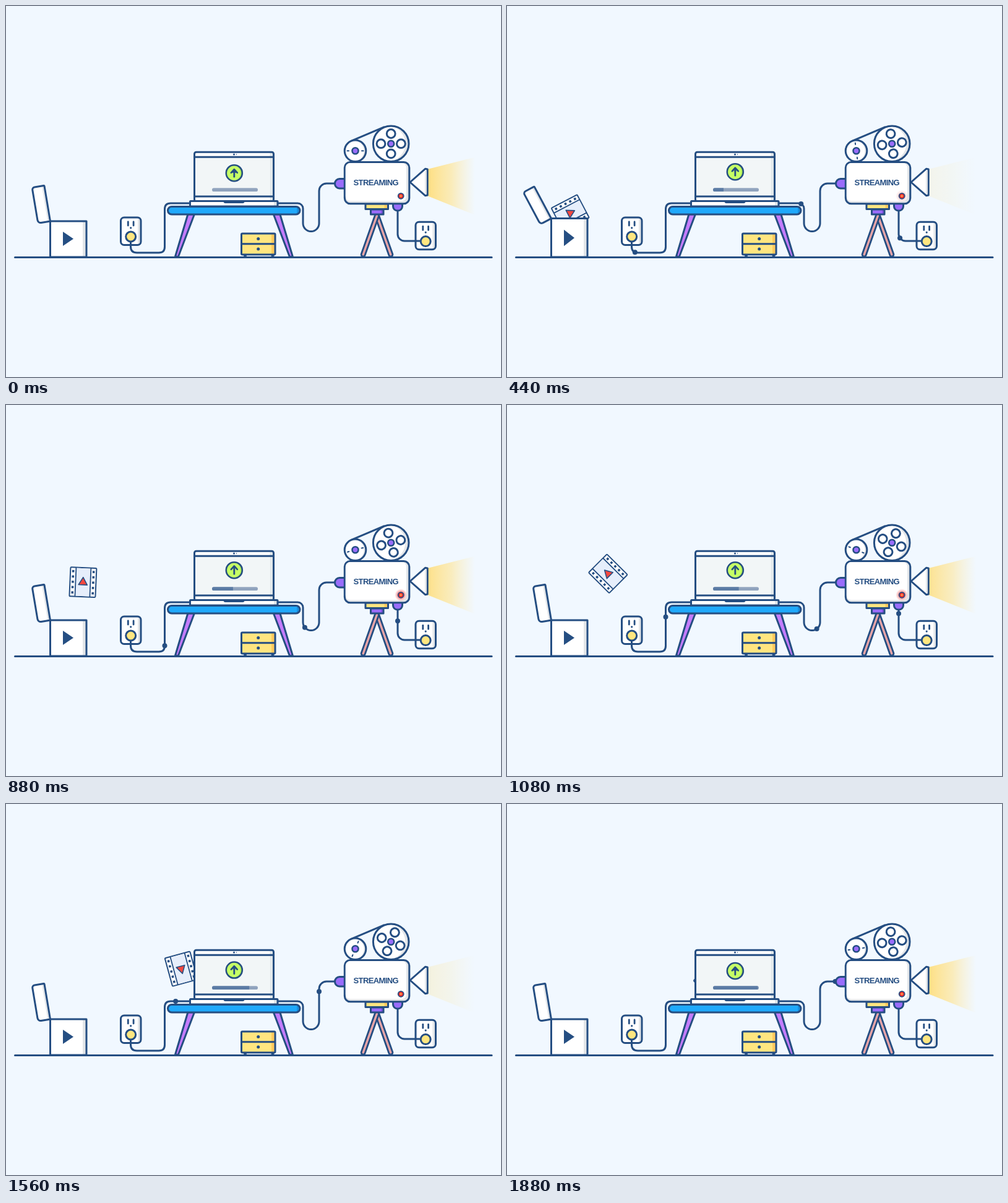
Write an HTML page with a canvas that moves like this. It is 800 by 600 pixels and loops after 1920 ms.

```html
<!DOCTYPE html>
<html lang="en">
<head>
<meta charset="utf-8">
<title>Streaming</title>
<style>
html, body { margin: 0; width: 100%; height: 100%; overflow: hidden; background: #f1f8ff; }
canvas { display: block; width: 800px; height: 600px; }
</style>
</head>
<body>
<canvas id="stage" width="800" height="600"></canvas>
<script>
const ctx = document.getElementById('stage').getContext('2d');
const LOOP = 1920, STEP = 40, TAU = Math.PI * 2;
const NAVY = '#254e82', WHITE = '#fff', SHADE = '#e3e6e9', PURPLE = '#9a6dfb',
      YELLOW = '#ffe680', ORANGE = '#ffcb5e';

const part = (t, from, to) => Math.min(1, Math.max(0, (t - from) / (to - from)));
const mix = (a, b, u) => a + (b - a) * u;
const hump = u => Math.sin(Math.PI * u);
const bezier = (u, a, b, c, d) => {
  const w = 1 - u;
  return w * w * w * a + 3 * w * u * (w * b + u * c) + u * u * u * d;
};

// Straight runs between [time, distance] points
function along(t, keys) {
  const i = Math.max(1, keys.findIndex(k => k[0] >= t));
  const [t0, a] = keys[i - 1], [t1, b] = keys[i];
  return mix(a, b, part(t, t0, t1));
}

function cable(d, ...keys) {
  const el = document.createElementNS('http://www.w3.org/2000/svg', 'path');
  el.setAttribute('d', d);
  return { el, shape: new Path2D(d), keys };
}
const cables = [
  cable('M201.5 372V389Q201.5 399 211.5 399H247Q256.5 399 256.5 389.5V328.5Q256.5 319 266 319H303',
    [0, 0], [200, 19], [680, 38], [1080, 131], [LOOP, 197]),
  cable('M434 319H471.5A8.5 8.5 0 0 1 480 327.5V351.5A13 13 0 0 0 506 351.5V299A12 12 0 0 1 518 287H538',
    [0, 0], [680, 64], [1360, 131], [1560, 164], [LOOP, 204]),
  cable('M678 380H644A11 11 0 0 1 633 369V318',
    [0, 0], [200, 30], [1360, 100], [LOOP, 102])
];

function paint(fill, width = 3) {
  if (fill) { ctx.fillStyle = fill; ctx.fill(); }
  if (width) { ctx.lineWidth = width; ctx.strokeStyle = NAVY; ctx.stroke(); }
}

function poly(points, fill, width) {
  ctx.beginPath();
  points.forEach(p => ctx.lineTo(...p));
  ctx.closePath();
  paint(fill, width);
}

function line(x1, y1, x2, y2, width = 3, color = NAVY) {
  ctx.beginPath();
  ctx.moveTo(x1, y1);
  ctx.lineTo(x2, y2);
  ctx.lineWidth = width;
  ctx.strokeStyle = color;
  ctx.stroke();
}

// Rounded rectangle given by its edges, with an optional shaded right side
function panel(x1, y1, x2, y2, r, fill, shade, side = 6, width = 3) {
  ctx.beginPath();
  ctx.roundRect(x1, y1, x2 - x1, y2 - y1, r);
  paint(fill, 0);
  if (shade) {
    ctx.save();
    ctx.clip();
    ctx.fillStyle = shade;
    ctx.fillRect(x2 - side, y1, side, y2 - y1);
    ctx.restore();
  }
  paint(null, width);
}

function disc(x, y, r, fill, shade, width = 3) {
  const ring = cx => {
    ctx.beginPath();
    ctx.arc(cx, y, r, 0, TAU);
  };
  ring(x);
  paint(shade || fill, 0);
  if (shade) {
    ctx.save();
    ctx.clip();
    ring(x - r * .2);
    paint(fill, 0);
    ctx.restore();
    ring(x);
  }
  paint(null, width);
}

function placed(x, y, degrees, draw) {
  ctx.save();
  ctx.translate(x, y);
  ctx.rotate(degrees * Math.PI / 180);
  draw();
  ctx.restore();
}

// Hops out of the box, then tumbles in an arc behind the laptop
function filmPose(t) {
  if (t < 680) {
    const u = part(t, 300, 680);
    return [mix(100, 106, u), mix(377, 306.5, 1 - (1 - u) ** 2), -75 * u];
  }
  const u = part(t, 680, 1880);
  return [
    bezier(u, 106, 116, 306, 333),
    bezier(u, 306.5, 261, 249, 286),
    bezier(u, -75, -53, -349, -318)
  ];
}

function film(t) {
  placed(...filmPose(t), () => {
    panel(-23.5, -21, 23.5, 21, 1.5, WHITE, null, 0, 2);
    ctx.fillStyle = '#e6eefb';
    ctx.fillRect(-22.5, -12, 45, 24);
    for (const s of [-1, 1]) {
      line(-23, 12 * s, 23, 12 * s, 1.8);
      ctx.fillStyle = NAVY;
      for (let i = -2; i <= 2; i++) ctx.fillRect(i * 8.6 - 1.8, s * 16.5 - 1.8, 3.6, 3.6);
    }
    poly([[8, 0], [-4.2, -7], [-4.2, 7]], '#f5483f', 1.6);
  });
}

function box(t) {
  const u = part(t, 0, 770);
  const lift = 4.5 * hump(u), top = 348 - lift;
  placed(71.5, top, -9.5 - 18.5 * hump(u ** 1.3), () =>
    panel(-20, -58.5, 0, 0, [4, 1, 1, 5], WHITE, SHADE, 4));
  panel(71.5, top, 130, 406, 0, WHITE, SHADE, 6);
  const mid = 376.5 - lift / 3, half = 11.5 + lift * .4;
  poly([[92, mid - half], [109, mid], [92, mid + half]], NAVY, 0);
}

function outlet(x, y) {
  panel(x - 16.2, y, x + 16.3, y + 44.5, 5.5, WHITE, SHADE, 5);
  for (const dx of [-4.4, 4.4]) line(x + dx, y + 7, x + dx, y + 13, 2.8);
  disc(x, y + 16.8, 1.6, NAVY, null, 0);
}

function cords(t) {
  for (const c of cables) {
    ctx.lineWidth = 3;
    ctx.strokeStyle = NAVY;
    ctx.stroke(c.shape);
    const p = c.el.getPointAtLength(along(t, c.keys));
    disc(p.x, p.y, 4, NAVY, null, 0);
  }
}

function table() {
  for (const s of [-1, 1]) {
    const x = dx => 368.4 + s * dx;
    poly([[x(64), 337], [x(74.5), 337], [x(95), 405.5], [x(90), 405.5]], '#c47cfd');
  }
  panel(261.5, 324.5, 475, 337, 6.2, '#20a9fb', '#178fe0', 5);
}

function drawers() {
  for (const x of [385.5, 430]) line(x, 404, x + 2, 404);
  panel(380.5, 368, 435, 402, 1.5, YELLOW, ORANGE, 6);
  line(381, 384.7, 434, 384.7);
  for (const y of [376.5, 393]) disc(407.7, y, 2.5, NAVY, null, 0);
}

function upload(t) {
  const rise = hump(t / LOOP), tip = -6 - rise * .8;
  placed(368.8, 270.2 - 3 * rise, 0, () => {
    disc(0, 0, 13, '#c6ff66', '#a4e552', 2.6);
    ctx.beginPath();
    ctx.moveTo(-5, tip + 5.5);
    ctx.lineTo(0, tip);
    ctx.lineTo(5, tip + 5.5);
    paint(null, 2.6);
    ctx.globalAlpha = 1 - rise;
    paint(NAVY, 0);
    ctx.globalAlpha = 1;
    line(0, tip + 1, 0, 6, 2.8);
  });
}

function progress(t) {
  const x = 333, y = 294.2, w = 74, h = 6;
  ctx.save();
  ctx.beginPath();
  ctx.roundRect(x, y, w, h, 3);
  ctx.clip();
  ctx.fillStyle = '#90a3bd';
  ctx.fillRect(x, y, w, h);
  ctx.fillStyle = '#5b7ba4';
  ctx.fillRect(x, y, w * t / LOOP, h);
  ctx.restore();
}

function laptop(t) {
  panel(304.5, 236.3, 432.5, 316, 3, WHITE, '#e1e8eb', 6);
  ctx.fillStyle = '#f2f6f7';
  ctx.fillRect(306, 245, 120.5, 62);
  for (const y of [244.3, 308]) line(305, y, 432, y);
  disc(368.5, 240, 1.5, NAVY, null, 0);
  disc(372.5, 240, .7, NAVY, null, 0);
  panel(297.5, 315.5, 439, 324, 1, WHITE, '#e1e8eb', 6);
  panel(352.5, 315.5, 384.5, 318, [0, 0, 2, 2], NAVY, null, 0, 2);
  progress(t);
  upload(t);
}

function beam(t) {
  const g = ctx.createLinearGradient(682, 0, 758, 0);
  g.addColorStop(0, 'rgba(255,222,124,.95)');
  g.addColorStop(.5, 'rgba(255,228,146,.64)');
  g.addColorStop(1, 'rgba(255,235,175,0)');
  ctx.globalAlpha = .57 + .43 * Math.cos(2 * TAU * t / LOOP);
  poly([[681, 264], [758, 244.5], [758, 338], [681, 307]], g, 0);
  ctx.globalAlpha = 1;
}

function tripod() {
  for (const s of [1, -1]) {
    const foot = 599.5 + s * 22.3;
    line(599.5, 339, foot, 402, 9);
    line(599.5, 339, foot, 402, 3.4, '#e8a5a8');
  }
  panel(589.5, 329, 610, 337, 0, PURPLE, '#8656e6', 4);
  panel(581, 320, 617.5, 328.5, 0, YELLOW, ORANGE, 6);
}

function reels(t) {
  const turn = 360 * t / LOOP;
  line(557.7, 218.4, 610.7, 195.8);
  disc(564.5, 234.3, 17.3, WHITE, SHADE);
  placed(564.5, 234.3, turn, () => {
    for (const s of [-1, 1]) line(s * 10.5, 0, s * 13, 0, 2);
  });
  disc(564.5, 234.3, 5, PURPLE, null, 2.6);
  disc(622.2, 222.7, 28.8, WHITE, SHADE);
  placed(622.2, 222.7, turn, () => {
    for (let a = 0; a < TAU; a += TAU / 4)
      disc(16.2 * Math.cos(a), 16.2 * Math.sin(a), 6.9, WHITE);
  });
  disc(622.2, 222.7, 5, PURPLE, null, 2.6);
}

function led(t) {
  const x = 638.2, y = 307.3;
  const halo = ctx.createRadialGradient(x, y, 3, x, y, 10);
  halo.addColorStop(0, 'rgba(255,50,50,.8)');
  halo.addColorStop(1, 'rgba(255,70,70,0)');
  ctx.globalAlpha = .95 * hump(part(t, 300, 1500));
  disc(x, y, 10, halo, null, 0);
  ctx.globalAlpha = 1;
  disc(x, y, 4.5, '#ea3030', null, 1.8);
  disc(x, y, 1.7, '#ff9a4a', null, 0);
}

function camera(t) {
  tripod();
  reels(t);
  panel(531.5, 279.5, 549, 295, [7.5, 0, 0, 7.5], PURPLE);
  panel(625.5, 317, 640.5, 331, [0, 0, 7, 7], PURPLE);
  poly([[653, 285], [677.5, 263.3], [681.2, 264], [681.2, 306], [677.5, 306.7]], WHITE, 3);
  ctx.fillStyle = SHADE;
  ctx.fillRect(677, 267, 2.7, 36);
  panel(547.3, 252.5, 651.8, 319.8, 9, SHADE);
  panel(548.8, 254, 647, 315.5, 7.5, WHITE, null, 0, 0);
  ctx.fillStyle = NAVY;
  ctx.font = 'bold 13px "Liberation Sans", Arial, sans-serif';
  ctx.letterSpacing = '-0.6px';
  ctx.textAlign = 'center';
  ctx.fillText('STREAMING', 597.8, 290);
  led(t);
}

function draw(t) {
  ctx.fillStyle = '#f1f8ff';
  ctx.fillRect(0, 0, 800, 600);
  ctx.lineCap = ctx.lineJoin = 'round';
  film(t);
  beam(t);
  line(14.5, 406.6, 785, 406.6);
  box(t);
  outlet(201.7, 342);
  outlet(678.2, 349.3);
  cords(t);
  disc(201.7, 373, 8, YELLOW, ORANGE);
  disc(678.2, 380.6, 8, YELLOW, ORANGE);
  table();
  drawers();
  laptop(t);
  camera(t);
}

const start = performance.now();
function tick() {
  const t = (performance.now() - start) % LOOP;
  draw(Math.floor(t / STEP) * STEP);
  requestAnimationFrame(tick);
}
tick();
</script>
</body>
</html>
```
